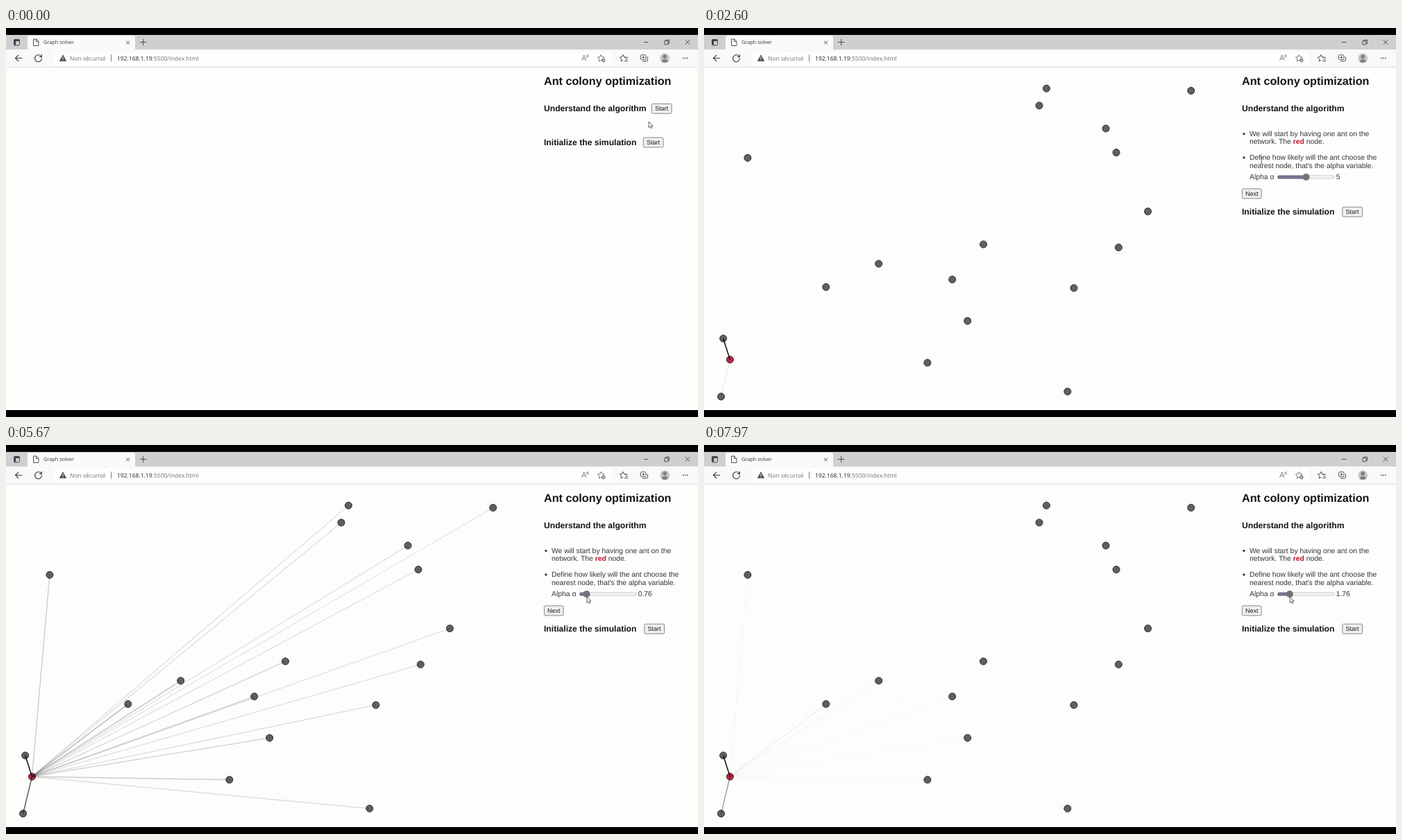
Animation of 997x561 px, one loop 8000 ms. Source, as an HTML page:

```html
<!DOCTYPE html>
<html lang="en">
<head>
<meta charset="utf-8">
<title>Graph solver</title>
<style>
  html, body { margin: 0; width: 100%; height: 100%; overflow: hidden; background: #000; }
  svg { display: block; width: 997px; height: 561px; text-rendering: geometricPrecision; }
  .page { font: 10.38px "Liberation Sans", Arial, sans-serif; fill: #343438; }
  .page .title { font-size: 16.2px; font-weight: bold; fill: #141416; }
  .page .heading { font-size: 12.14px; font-weight: bold; fill: #141416; }
  .red { font-weight: bold; fill: #c3112f; }
  .button rect { fill: #efeff1; stroke: #88888e; }
  .button text { font-size: 9px; fill: #1c1c20; text-anchor: middle; }
  .chrome { font: 8.52px "Open Sans", sans-serif; fill: #707074; }
  .icon { fill: none; stroke: #404044; stroke-width: .9; }
  .node { fill: #606062; stroke: #2c2c2e; stroke-width: 1; }
  .node.ant { fill: #b92945; stroke: #4c1c28; }
  .edge { stroke: #101012; stroke-width: 1.5; }
</style>
</head>
<body>
<svg viewBox="0 0 997 561">
  <rect width="997" height="561"/>
  <rect y="10" width="997" height="541" fill="#fdfdfc"/>

  <g class="chrome">
    <rect y="10" width="997" height="21" fill="#cfcfd2"/>
    <path d="M31 31.5V14q0-3 3-3H183q3 0 3 3V31.5z" fill="#fafafa"/>
    <rect y="31" width="997" height="25" fill="#f9f9fa"/>
    <rect x="68" y="34" width="804" height="19" rx="3" fill="#fefefe"/>
    <path d="M0 56.5H997" stroke="#dedee0"/>
    <text x="54" y="23.4" font-size="7.36" fill="#333">Graph solver</text>
    <text x="92" y="46.6">Non sécurisé</text>
    <path d="M151.7 38.5V48.5" stroke="#77777b"/>
    <text x="160" y="46.6"><tspan fill="#242428">192.168.1.19</tspan>:5500/index.html</text>

    <g class="icon">
      <rect x="11.5" y="16.5" width="8" height="8.5" rx="1.5"/>
      <path d="M11.5 17.8H19.5M12.9 18V24.5" stroke-width="2.4"/>
      <path d="M39.5 16h4.2l3.2 3.2v6.3h-7.4zM43.5 16v3.4h3.4"/>
      <path d="M173 18.5l5 5m0-5l-5 5M193 20.5h9.4m-4.7-4.7v9.4"/>
      <path d="M919 20.5h6.5M978.8 17.3l6.4 6.4m0-6.4l-6.4 6.4"/>
      <path d="M948.8 18.8h5v5h-5zM950.5 18.6v-1.3h5v5h-1.4"/>
      <path d="M23.3 43.5H13.5m4.5-4.5l-4.5 4.5 4.5 4.5" stroke-width="1.2"/>
      <path d="M50.9 41.2A5 5 0 1 0 51.6 43.7M51.4 38.3v3.3h-3.3" stroke-width="1.2"/>
      <path d="M829.5 47l3.2-8 3.2 8m-5.3-2.7h4.2M836.5 39q1.3 1.4 0 3M838 38q2 2.3 0 5" stroke="#66666a" stroke-width=".8"/>
      <path d="M857.3 38.6l1.5 3.1 3.4.5-2.5 2.4.6 3.4-3-1.6-3 1.6.6-3.4-2.5-2.4 3.4-.5z" stroke="#66666a"/>
      <circle cx="860.8" cy="46.6" r="2.3" fill="#77777b" stroke="#77777b"/>
      <path d="M859.4 46.6h2.8m-1.4-1.4v2.8" stroke="#fff" stroke-width=".7"/>
      <path d="M889 38.6l1.4 3.1 2.6.5M889 38.6l-1.5 3.1-3.3.5 2.5 2.4-.6 3.4 3-1.6M891 42.4h5m-4 2.6h4m-5 2.6h5"/>
      <rect x="914.5" y="38.8" width="7.5" height="7" rx="1.5"/>
      <path d="M917 48h5.5q2 0 2-2v-4.5M918.3 40.5v3.8m-1.9-1.9h3.8"/>
    </g>
    <path d="M82 38.2l5.2 9.8H76.8z" fill="#4f4f53"/>
    <path d="M82 41.3v3.5m0 1v1.2" stroke="#fff"/>
    <circle cx="949.2" cy="43.6" r="7" fill="#c9c9cc"/>
    <circle cx="949.2" cy="41.2" r="2.9" fill="#808084"/>
    <path d="M944.7 48.5q0-3.6 4.5-3.6t4.5 3.6q-4.5 3.2-9 0z" fill="#808084"/>
    <path d="M975 43.5h1.5m1.5 0h1.5m1.5 0h1.5" stroke="#38383c" stroke-width="1.4"/>
  </g>

  <g id="graph"><g id="nodes"></g><g id="edges"></g></g>

  <g class="page">
    <text class="title" x="775" y="82.3">Ant colony optimization</text>
    <text class="heading" x="775" y="120.2">Understand the algorithm</text>
    <g id="learn" class="button">
      <rect x="930.3" y="109.3" width="28.7" height="14" rx="1.5"/>
      <text x="944.6" y="119.4">Start</text>
    </g>
    <g id="intro">
      <circle cx="777.9" cy="152.6" r="1.7"/>
      <text x="786" y="155.6">We will start by having one ant on the</text>
      <text x="786" y="167.4">network. The <tspan class="red">red</tspan> node.</text>
    </g>
    <g id="tuning">
      <circle cx="777.9" cy="186.9" r="1.7"/>
      <text x="786" y="189.9">Define how likely will the ant choose the</text>
      <text x="786" y="201.7">nearest node, that's the alpha variable.</text>
      <text x="786" y="217.7">Alpha α</text>
      <rect x="826.5" y="212.7" width="82" height="4.6" rx="2.3" fill="#f1f1f1" stroke="#c9c9cc" stroke-width=".8"/>
      <rect id="fill" x="826.2" y="212.4" height="5.2" rx="2.6" fill="#747490"/>
      <circle id="thumb" cy="215" r="5" fill="#727278"/>
      <text id="value" x="910.7" y="217.7"></text>
    </g>
    <g id="below">
      <g id="next" class="button">
        <rect x="775.4" y="180.3" width="27.7" height="14" rx="1.5"/>
        <text x="789.2" y="190.4">Next</text>
      </g>
      <text class="heading" x="775" y="217.7">Initialize the simulation</text>
      <g id="simulate" class="button">
        <rect x="919.8" y="206.6" width="28.7" height="14" rx="1.5"/>
        <text x="934.1" y="216.7">Start</text>
      </g>
    </g>
  </g>

  <g id="cursor">
    <path id="arrow" d="M0 0V8.6L2 6.9 3.3 9.8 4.8 9.1 3.5 6.3H6z" fill="#fff" stroke="#505058" stroke-width=".9"/>
    <path id="beam" d="M-1.7-4.5q1.7 0 1.7 1 0-1 1.7-1M0-3.5v7.5M-1.7 5q1.7 0 1.7-1 0 1 1.7 1" fill="none" stroke="#505058" stroke-width=".9"/>
  </g>
</svg>
<script>
  const LOOP = 8000, LEARN_CLICK = 800, NEXT_CLICK = 2250, DRAG = 3300;
  const ant = [37.5, 478.2];
  const others = [
    [27.7, 447.8], [24.6, 531.6], [62.9, 187.3], [175.8, 373.6], [251.7, 340],
    [357.7, 362.7], [402.5, 312], [379.7, 422.4], [321.9, 482.8], [523.8, 524.3],
    [532.9, 375], [597.3, 316.5], [639.5, 264.6], [594, 179.6], [579, 145],
    [483, 111.9], [493.4, 87.2], [701.7, 90.4]
  ];
  // Tracks are lists of [time, ...values]
  const pointer = [
    [0, 926, 135], [370, 943, 116], [950, 943, 116], [1370, 883, 154],
    [1850, 792, 187], [2420, 792, 187], [2600, 803, 191], [3080, 867, 218]
  ];
  const alphaTrack = [
    [DRAG, 5], [4570, 3.31], [5670, .76], [6250, 0], [7330, 0], [7970, 1.76]
  ];

  const el = id => document.getElementById(id);
  const show = (id, on) => el(id).style.display = on ? '' : 'none';
  const add = (parent, tag, attrs) => {
    const item = document.createElementNS('http://www.w3.org/2000/svg', tag);
    for (const key in attrs) item.setAttribute(key, attrs[key]);
    return el(parent).appendChild(item);
  };
  const sample = (track, t) => {
    const i = track.findIndex(key => key[0] > t);
    if (i === 0) return track[0].slice(1);
    if (i < 0) return track[track.length - 1].slice(1);
    const a = track[i - 1], b = track[i], p = (t - a[0]) / (b[0] - a[0]);
    return a.slice(1).map((v, k) => v + (b[k + 1] - v) * p);
  };

  const distance = ([x, y]) => Math.hypot(x - ant[0], y - ant[1]);
  const nearest = Math.min(...others.map(distance));
  others.forEach(([cx, cy]) => add('nodes', 'circle', { class: 'node', cx, cy, r: 5 }));
  add('nodes', 'circle', { class: 'node ant', cx: ant[0], cy: ant[1], r: 5 });
  const edges = others.map(node => ({
    ratio: nearest / distance(node),
    line: add('edges', 'line', { class: 'edge', x1: ant[0], y1: ant[1], x2: node[0], y2: node[1] })
  }));

  function draw(t) {
    const phase = t < LEARN_CLICK ? 0 : t < NEXT_CLICK ? 1 : 2;
    show('learn', phase === 0);
    show('graph', phase > 0);
    show('intro', phase > 0);
    show('next', phase > 0);
    show('tuning', phase === 2);
    show('edges', phase === 2);
    el('below').setAttribute('transform', `translate(0 ${[-48.6, 0, 51.6][phase]})`);
    el('simulate').setAttribute('transform', `translate(${phase ? 0 : -1.6} 0)`);

    const alpha = sample(alphaTrack, t)[0], thumbX = 831 + 7.3 * alpha;
    el('thumb').setAttribute('cx', thumbX);
    el('fill').setAttribute('width', thumbX - 826.2);
    el('value').textContent = +alpha.toFixed(2);
    edges.forEach(({ line, ratio }) => line.setAttribute('opacity', ratio ** alpha));

    const [x, y] = t < DRAG ? sample(pointer, t) : [thumbX + .3, 218.8];
    const overText = t > 1180 && t < 1640 || t > NEXT_CLICK && t < 2850;
    show('arrow', !overText);
    show('beam', overText);
    el('cursor').setAttribute('transform', `translate(${x} ${y})`);
  }

  function tick() {
    draw(performance.now() % LOOP);
    requestAnimationFrame(tick);
  }
  tick();
</script>
</body>
</html>
```
